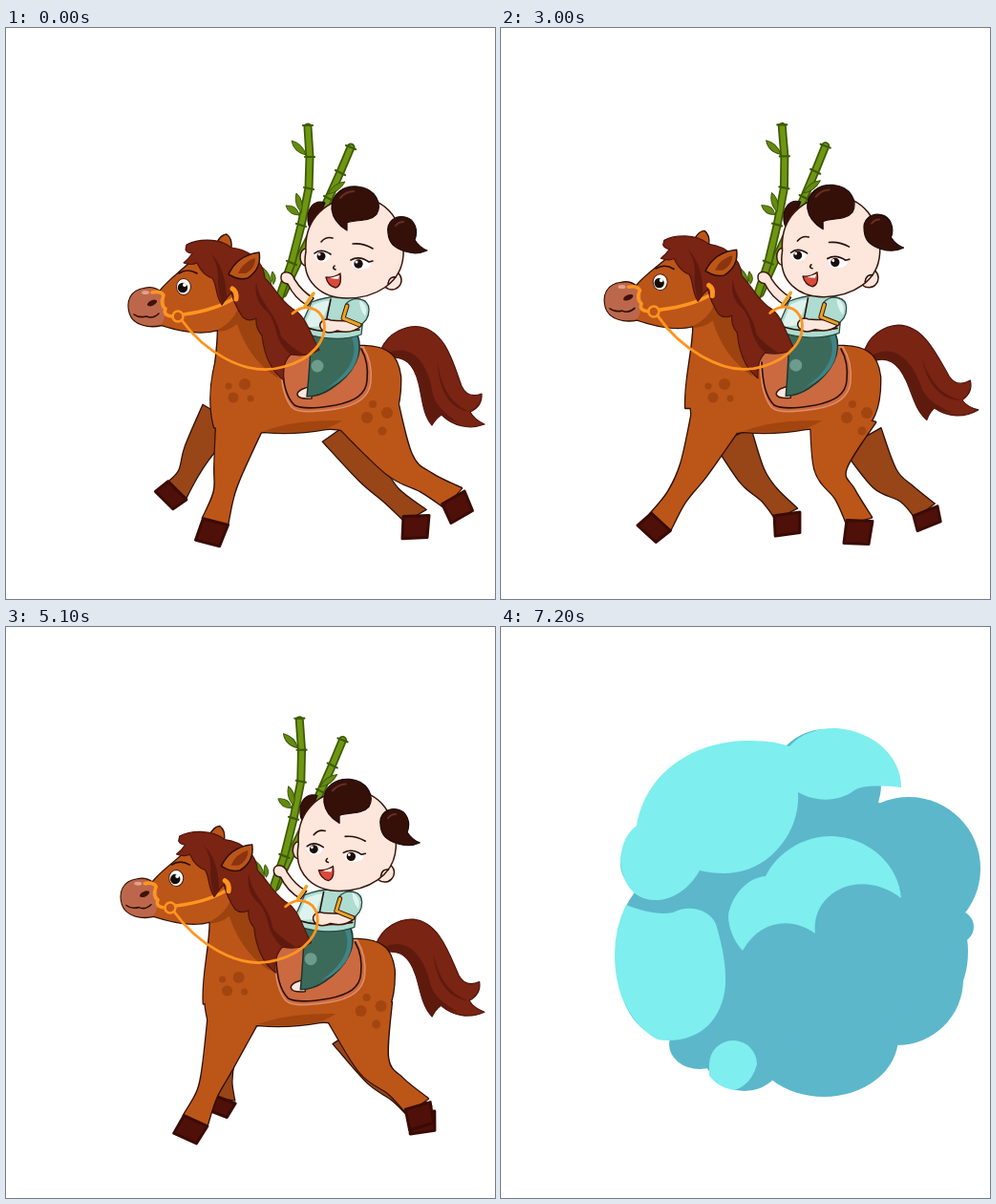
Write an HTML page that moves like this. It is 512 by 598 pixels and loops after 7.5 s.

```html
<!DOCTYPE html>
<html lang="en">
<head>
<meta charset="utf-8">
<title>Rider</title>
<style>
html, body { margin: 0; width: 100%; height: 100%; overflow: hidden; background: #fff; }
svg { display: block; width: 100%; height: 100%; }
path, circle, ellipse { stroke-linejoin: round; stroke-linecap: round; }
.edge { fill: #2d1007; stroke: #2d1007; stroke-width: 2.6; }
.coat { fill: #bc5518; }
.far { fill: #984517; stroke: #2d1007; stroke-width: 1.3; }
.hoof { fill: #4e1008; stroke: #3a0b05; stroke-width: 3; }
.mane { fill: #7a2413; stroke: #4d150b; stroke-width: 1.2; }
.shade { fill: #5f1a0e; }
.spot { fill: #a2450f; }
.skin { fill: #fde6dc; stroke: #3a1509; stroke-width: 1.5; }
.hair { fill: #351009; stroke: #1e0805; stroke-width: 1.2; }
.shirt { fill: #aedcd0; stroke: #2b4a45; stroke-width: 1.3; }
.strap { fill: none; stroke: #ff951f; stroke-width: 3.6; }
.thin { fill: none; stroke: #2b0f08; stroke-width: 1.6; }
.cane { fill: none; stroke: #3d5a06; stroke-width: 9; }
.pith { fill: none; stroke: #6f9611; stroke-width: 5.5; }
.node { fill: none; stroke: #3d5a06; stroke-width: 2.2; }
.leaf { fill: #648a10; stroke: #3d5a06; stroke-width: 1; }
</style>
</head>
<body>
<svg viewBox="0 0 512 598">
<defs>
  <path id="trunk" d="M226 330C214 362 211 390 218 418Q242 428 270 423Q302 426 335 420C350 418 360 425 384 424C406 422 414 395 413 365C410 341 398 334 375 333H300Z"/>
  <path id="neck" d="M216 402C214 372 222 346 222 316C205 321 185 318 163 311C150 314 134 311 130 299C126 286 131 275 145 273C152 271 157 273 161 276C172 262 190 250 205 235L240 240C270 260 300 300 320 335L290 400Z"/>
</defs>
<g id="ride">
  <g data-part="boy">
    <path class="cane" d="M290 278L308 240L324 208L338 178L350 151L361 125"/>
    <path class="pith" d="M290 278L308 240L324 208L338 178L350 151L361 125"/>
    <path class="leaf" d="M337 174Q343 162 355 161Q349 172 337 174Z"/>
    <path class="cane" d="M286 283L299 246L309 207L317 168L318 135L316 104"/>
    <path class="pith" d="M286 283L299 246L309 207L317 168L318 135L316 104"/>
    <path class="node" d="M311 102h10M313 135h10M312 167l10 2M304 205l10 3M294 244l10 4M356 123l10 4M345 149l10 5M333 176l10 5"/>
    <path class="leaf" d="M314 133Q301 130 299 118Q311 121 314 133ZM307 196Q296 196 293 186Q305 185 307 196ZM309 193Q301 184 304 173Q313 181 309 193ZM278 270Q267 263 266 249Q278 256 278 270ZM280 268Q276 261 279 255Q285 262 280 268ZM274 272Q262 270 256 260Q270 261 274 272Z"/>
  </g>
  <g data-part="tail">
    <path class="mane" d="M392 338C400 318 420 311 434 313C460 318 468 350 477 375C482 386 490 386 498 383Q499 396 486 402Q490 410 501 415C485 421 468 417 456 405Q450 409 446 416C436 404 436 388 432 372C427 352 418 342 398 346Z"/>
    <path class="shade" d="M400 340C432 328 444 362 447 384C450 395 460 404 473 413Q462 410 456 405Q450 409 446 416C436 404 436 388 432 372C427 352 418 342 400 345Z"/>
    <path class="shade" d="M452 350C456 378 466 393 485 402C464 398 453 380 452 350Z"/>
  </g>
  <g id="farLegs"></g>
  <g class="edge">
    <g id="legEdges"></g>
    <g data-part="body"><use href="#trunk"/></g>
    <g data-part="head"><use href="#neck"/></g>
  </g>
  <g class="coat">
    <g id="nearLegs"></g>
    <g data-part="body"><use href="#trunk"/></g>
    <g data-part="head"><use href="#neck"/></g>
  </g>
  <g data-part="body">
    <g class="spot">
      <circle cx="250" cy="373" r="6"/><circle cx="238" cy="387" r="5.5"/><circle cx="256" cy="388" r="3.5"/><circle cx="233" cy="375" r="3.5"/>
      <circle cx="378" cy="408" r="6"/><circle cx="399" cy="403" r="6"/><circle cx="394" cy="422" r="4.5"/><circle cx="384" cy="394" r="4"/>
      <path d="M270 422Q303 410 352 411Q340 419 328 421Q298 425 270 422Z"/>
    </g>
    <path d="M287 342C288 365 289 385 299 397C306 404 325 402 345 399C366 396 380 388 382 371Q384 350 374 334L300 330Z" fill="#cb6a40" stroke="#e08f68" stroke-width="1.5"/>
    <path class="thin" d="M289 350C290 372 293 386 302 395C311 400 328 398 345 395C365 391 377 384 378 369Q380 350 372 336" stroke="#5c2112"/>
  </g>
  <g data-part="boy">
    <path class="skin" d="M320 376C312 376 305 380 305 384Q306 389 320 388Z"/>
    <path d="M306 317C325 326 350 326 368 321C375 340 365 362 340 378Q328 386 315 386C317 368 318 350 319 336Q307 330 306 317Z" fill="#3b6a5a" stroke="#1f352f" stroke-width="1.5"/>
    <path d="M362 324C370 344 358 362 336 377Q352 371 362 358Q373 342 367 322Z" fill="#3f8486"/>
    <circle cx="326" cy="354" r="6.5" fill="#6d9c8c"/>
    <path class="skin" d="M322 283Q310 276 302 263C299 254 289 254 288 260Q287 267 295 268Q302 283 316 291Z"/>
    <path class="shirt" d="M320 287C340 279 362 280 376 286L372 321C350 329 325 325 306 317Q313 303 320 287Z"/>
    <path d="M322 290Q334 285 339 286L329 312Q319 314 312 312Z" fill="#dff3ee"/>
    <path class="thin" d="M340 284L332 323M308 311Q330 322 370 316" stroke="#39736b"/>
    <path d="M322 278L313 291" stroke="#e9a528" stroke-width="3.5"/>
    <path class="skin" d="M372 307Q350 307 340 306C333 303 326 309 330 315Q336 322 347 317Q362 321 372 312Z"/>
    <path class="shirt" d="M356 289C364 280 380 283 380 295Q380 307 369 312L352 305Z"/>
    <path d="M370 285Q380 290 376 302Q370 294 370 285Z" fill="#dff3ee"/>
    <path d="M357 291L353 304L370 311" fill="none" stroke="#3a1509" stroke-width="5"/>
    <path d="M357 291L353 304L370 311" fill="none" stroke="#e9a528" stroke-width="3"/>
    <path class="hair" d="M334 183C322 179 315 190 316 202Q317 211 322 212Z"/>
    <ellipse class="skin" cx="314" cy="240" rx="6" ry="9"/>
    <circle class="skin" cx="404" cy="264" r="10"/>
    <path class="skin" d="M314 234C312 200 335 178 368 178C400 178 418 205 416 238C414 268 386 283 357 283C331 283 308 266 314 234Z"/>
    <path class="thin" d="M400 268Q401 260 408 261M344 249Q341 252 345 253" stroke="#a65a43"/>
    <path class="hair" d="M341 190C340 172 355 165 368 166C388 168 394 185 388 195C380 204 365 200 357 204L357 212C347 206 342 198 341 190Z"/>
    <path class="hair" d="M400 215C398 202 408 196 418 198C428 200 432 212 428 222Q433 230 441 233Q430 238 418 234C406 230 401 225 400 215Z"/>
    <path d="M350 178Q356 171 364 171M408 207Q411 203 416 203" fill="none" stroke="#633024" stroke-width="2"/>
    <path class="thin" d="M330 224Q335 218 342 220M363 226Q374 225 384 231" stroke-width="2.6"/>
    <g fill="#fff"><ellipse cx="331" cy="239" rx="8" ry="6"/><ellipse cx="372" cy="247" rx="10" ry="6"/></g>
    <circle cx="330" cy="239" r="4.5" fill="#1b0d0a"/><circle cx="369" cy="247" r="4.7" fill="#1b0d0a"/>
    <circle cx="328" cy="237" r="1.5" fill="#fff"/><circle cx="367" cy="245" r="1.5" fill="#fff"/>
    <path class="thin" d="M323 236Q330 230 340 237M361 243Q370 238 380 245L384 244"/>
    <path d="M335 261Q343 262 350 257Q352 270 345 272Q337 270 335 261Z" fill="#d84b3c" stroke="#451108" stroke-width="1.3"/>
    <path d="M339 262L349 259L348 263Z" fill="#fff"/>
  </g>
  <g data-part="head">
    <path d="M222 316Q237 308 243 294L262 304Q270 330 285 367Q254 347 242 310Q234 317 222 318Z" fill="#9c430f"/>
    <path class="edge" d="M220 226Q225 216 231 216Q237 220 236 231Z" style="fill:#bc5518;stroke-width:1.4"/>
    <path d="M130 299C126 286 131 275 145 273Q156 271 161 277Q170 285 165 295Q168 303 163 310C150 314 134 311 130 299Z" fill="#bc674b"/>
    <ellipse cx="153" cy="288" rx="5.5" ry="2.7" transform="rotate(-25 153 288)" fill="#42120b"/>
    <ellipse cx="146" cy="277" rx="4" ry="2" fill="#e3a08a"/>
    <path class="thin" d="M134 300Q139 304 147 302Q154 305 160 299M181 257Q190 251 200 257"/>
    <ellipse cx="186" cy="271" rx="7.5" ry="8.5" fill="#fff" stroke="#4d1a0a"/>
    <circle cx="185" cy="272" r="5.2" fill="#170b08"/><circle cx="187" cy="269" r="2" fill="#fff"/>
    <path class="strap" d="M153 277Q162 275 165 280Q161 290 167 294Q164 301 174 302M186 300Q222 295 242 281"/>
    <circle class="strap" cx="180" cy="302" r="5.5" style="stroke-width:2.5"/>
    <path class="mane" d="M189 227C200 221 222 219 236 230C255 232 270 245 271 262C282 272 286 284 300 294C315 302 318 320 328 337Q315 345 298 342Q289 350 291 369C276 358 270 340 268 322Q261 314 262 304Q254 308 248 303Q239 290 236 277Q231 282 226 290C219 280 221 269 216 262Q206 259 200 246Q194 249 186 246Q192 241 195 236Q190 236 188 232Z"/>
    <path class="shade" d="M262 266C264 287 284 299 288 323C294 330 302 336 312 342Q304 343 298 342C278 326 286 306 270 294Q259 283 262 266ZM214 236Q230 250 231 282L226 288Q221 274 222 262Q222 246 214 236Z"/>
    <path d="M233 258Q242 238 265 235Q268 252 253 262Q246 264 239 261Z" fill="#bc5518" stroke="#2d1007" stroke-width="1.5"/>
    <path d="M243 257Q248 245 261 241Q261 252 251 257Z" fill="#8a3510"/>
    <path class="strap" d="M237 273Q242 276 241 284" style="stroke-width:5"/>
  </g>
  <path id="rein" class="strap" style="stroke-width:2.8"/>
</g>
<g id="fire" fill="#ff9a08">
  <path d="M10 209Q12 203 18 204Q20 196 27 196Q34 196 35 203Q41 207 46 214Q39 213 40 220Q35 218 32 223Q24 225 20 219Q11 219 10 209Z"/>
  <path d="M45 213C44 199 58 199 66 194Q78 191 90 197Q88 201 96 208L109 214L96 219Q91 225 88 230Q79 228 73 234Q60 230 56 232Q49 225 45 213Z"/>
  <path d="M110 216Q119 206 136 207Q153 205 162 211L172 216Q160 223 145 224Q122 228 110 216Z"/>
  <g fill="#ff7a16"><path d="M51 214Q54 200 72 202Q86 205 90 214Q85 224 72 224Q56 226 51 214Z"/><ellipse cx="137" cy="216" rx="18" ry="6"/></g>
</g>
<g id="puff">
  <g fill="#5cb7cb">
    <circle cx="427" cy="253" r="75"/><circle cx="415" cy="369" r="69"/><ellipse cx="440" cy="340" rx="49" ry="70"/>
    <circle cx="478" cy="314" r="17"/><ellipse cx="338" cy="430" rx="78" ry="62"/><circle cx="255" cy="454" r="44" transform="translate(0 -12)"/>
    <ellipse cx="208" cy="437" rx="32" ry="26"/><ellipse cx="310" cy="300" rx="172" ry="134"/><ellipse cx="170" cy="345" rx="50" ry="84"/>
    <circle cx="159" cy="247" r="34"/><circle cx="340" cy="165" r="58"/>
  </g>
  <g fill="#7eeeee">
    <path d="M142 208C152 150 205 118 262 119Q286 119 302 125C315 110 335 105 352 106C395 110 420 140 419 168Q380 164 370 171C355 183 330 184 311 173C314 215 280 258 234 258Q220 258 208 255C195 278 175 287 160 286C140 285 127 270 125 245Q126 220 142 208Z"/>
    <path d="M253 339C240 325 236 305 239 297C245 275 262 262 277 261C290 235 318 219 345 219C385 220 416 248 419 284C395 265 365 265 346 280C333 290 327 305 329 321C303 302 270 308 253 339Z"/>
    <path d="M131 291C150 298 165 302 180 299C195 291 217 294 225 311C232 335 236 355 235 375C232 410 210 433 175 433Q168 433 164 432C145 422 119 395 119 343Q119 315 131 291Z"/>
    <path d="M218 470V458A25 25 0 1 1 268 458Q262 480 244 485Q228 483 218 470Z"/>
  </g>
</g>
</svg>
<script>
const $ = id => document.getElementById(id);
const STEP = 300, LOOP = 7500, CYCLE = 8;

// Parts are [dx, dy, turn]; legs run hip, knee, cannon, fetlock, tip.
const reach = {
  body: [0, 0, 0], head: [0, 0, 0], boy: [0, 0, 0], tail: [0, 0, 0],
  nearFore: [246, 408, 233, 462, 228, 488, 219, 517, 213, 540],
  nearHind: [378, 400, 412, 457, 440, 476, 468, 492, 479, 511],
  farFore: [224, 405, 200, 445, 190, 468, 179, 484, 167, 496],
  farHind: [350, 420, 382, 465, 404, 490, 429, 511, 430, 534]
};
const stride = {
  body: [-16, 0, 0], head: [-22, -1, 1.5], boy: [-17, -1, -1], tail: [-13, 4, -10],
  nearFore: [224, 412, 202, 462, 184, 491, 167, 517, 154, 531],
  nearHind: [358, 405, 345, 462, 360, 488, 375, 516, 374, 540],
  farFore: [243, 428, 263, 469, 281, 489, 299, 509, 302, 530],
  farHind: [378, 430, 402, 472, 425, 488, 444, 506, 450, 521]
};
const gather = {
  body: [-13, -3, 0], head: [-24, -1, 1.5], boy: [-16, -4, 1.5], tail: [-26, -6, -29],
  nearFore: [228, 405, 211, 468, 222, 490, 236, 518, 234, 539],
  nearHind: [366, 400, 373, 466, 387, 488, 408, 513, 404, 533],
  farFore: [205, 400, 170, 438, 176, 462, 184, 486, 181, 504],
  farHind: [398, 415, 402, 448, 432, 471, 468, 482, 474, 502]
};
const rear = {
  body: [15, -27, 18], head: [7, -23, 19], boy: [23, -17, 17], tail: [20, 7, 18],
  nearFore: [248, 365, 217, 402, 222, 425, 229, 448, 226, 466],
  nearHind: [390, 385, 380, 455, 392, 482, 410, 515, 411, 538],
  farFore: [230, 338, 190, 344, 182, 368, 181, 391, 174, 410],
  farHind: [340, 395, 344, 460, 352, 480, 362, 500, 360, 522]
};
const PIVOT = { body: [335, 372], head: [335, 372], boy: [335, 372], tail: [398, 338] };
const WIDTHS = {
  nearFore: [52, 30, 21, 27], nearHind: [70, 33, 22, 27],
  farFore: [42, 29, 21, 26], farHind: [46, 31, 21, 26]
};

function mix(a, b, t, lift) {
  const pose = {};
  for (const key in a) pose[key] = a[key].map((v, i) => v + (b[key][i] - v) * t);
  for (const key in PIVOT) pose[key][1] -= lift;
  return pose;
}
const POSES = [
  reach, mix(reach, stride, 0.4, 6), stride, mix(stride, gather, 0.5, 2),
  gather, mix(gather, rear, 0.5, 1), rear, rear
];

function place(pose, part, x, y) {
  const [dx, dy, turn] = pose[part], [px, py] = PIVOT[part];
  const a = turn * Math.PI / 180, c = Math.cos(a), s = Math.sin(a);
  return [px + dx + (x - px) * c - (y - py) * s, py + dy + (x - px) * s + (y - py) * c];
}

const pt = p => p.map(v => v.toFixed(1)).join(" ");

// Catmull-Rom segments through the points
function curve(pts) {
  let d = "";
  for (let i = 0; i < pts.length - 1; i++) {
    const a = pts[i - 1] || pts[i], b = pts[i], c = pts[i + 1], e = pts[i + 2] || c;
    d += `C${pt(b.map((v, k) => v + (c[k] - a[k]) / 6))} ${pt(c.map((v, k) => v - (e[k] - b[k]) / 6))} ${pt(c)}`;
  }
  return d;
}

function offset(p, from, to, r) {
  const dx = to[0] - from[0], dy = to[1] - from[1], n = Math.hypot(dx, dy);
  return [p[0] - dy / n * r, p[1] + dx / n * r];
}

function legPaths(joints, widths) {
  const p = [0, 2, 4, 6, 8].map(i => joints.slice(i, i + 2));
  const side = sign => widths.map((w, i) => offset(p[i], p[i - 1] || p[i], p[i + 1], sign * w / 2));
  const left = side(1), right = side(-1).reverse();
  const [f, t] = [p[3], p[4]];
  const hoof = [[f, 13], [t, 15], [t, -11], [f, -14]].map(([q, r]) => pt(offset(q, f, t, r)));
  return {
    limb: `M${pt(left[0])}${curve(left)}L${pt(right[0])}${curve(right)}Z`,
    hoof: `M${hoof.join("L")}Z`
  };
}

function addPath(parent, cls) {
  const el = document.createElementNS("http://www.w3.org/2000/svg", "path");
  el.setAttribute("class", cls);
  return parent.appendChild(el);
}

const legs = ["farFore", "farHind", "nearFore", "nearHind"].map(name => {
  const near = name.startsWith("near"), home = $(near ? "nearLegs" : "farLegs");
  return {
    name,
    edge: near && addPath($("legEdges"), ""),
    limb: addPath(home, near ? "coat" : "far"),
    hoof: addPath(home, "hoof")
  };
});
const parts = [...document.querySelectorAll("[data-part]")];

function drawRide(pose) {
  for (const el of parts) {
    const name = el.dataset.part, [dx, dy, turn] = pose[name];
    el.setAttribute("transform", `translate(${dx} ${dy}) rotate(${turn} ${PIVOT[name].join(" ")})`);
  }
  for (const leg of legs) {
    const d = legPaths(pose[leg.name], WIDTHS[leg.name]);
    leg.limb.setAttribute("d", d.limb);
    leg.hoof.setAttribute("d", d.hoof);
    if (leg.edge) leg.edge.setAttribute("d", d.limb);
  }
  const h = (x, y) => pt(place(pose, "head", x, y)), b = (x, y) => pt(place(pose, "boy", x, y));
  $("rein").setAttribute("d", `M${h(184, 306)}C${h(205, 335)} ${b(248, 367)} ${b(290, 355)}` +
    `C${b(322, 347)} ${b(336, 326)} ${b(333, 308)}C${b(329, 291)} ${b(311, 289)} ${b(300, 299)}`);
}

const show = (id, on) => { $(id).style.display = on ? "" : "none"; };
let last = -1;
function tick() {
  const step = Math.floor(performance.now() % LOOP / STEP);
  if (step !== last) {
    last = step;
    const beat = step % CYCLE, cloud = step === LOOP / STEP - 1;
    show("ride", !cloud);
    show("puff", cloud);
    show("fire", !cloud && beat > 5);
    $("fire").setAttribute("transform", `translate(${beat === 6 ? 11 : 0} 0)`);
    drawRide(POSES[beat]);
  }
  requestAnimationFrame(tick);
}
tick();
</script>
</body>
</html>
```
